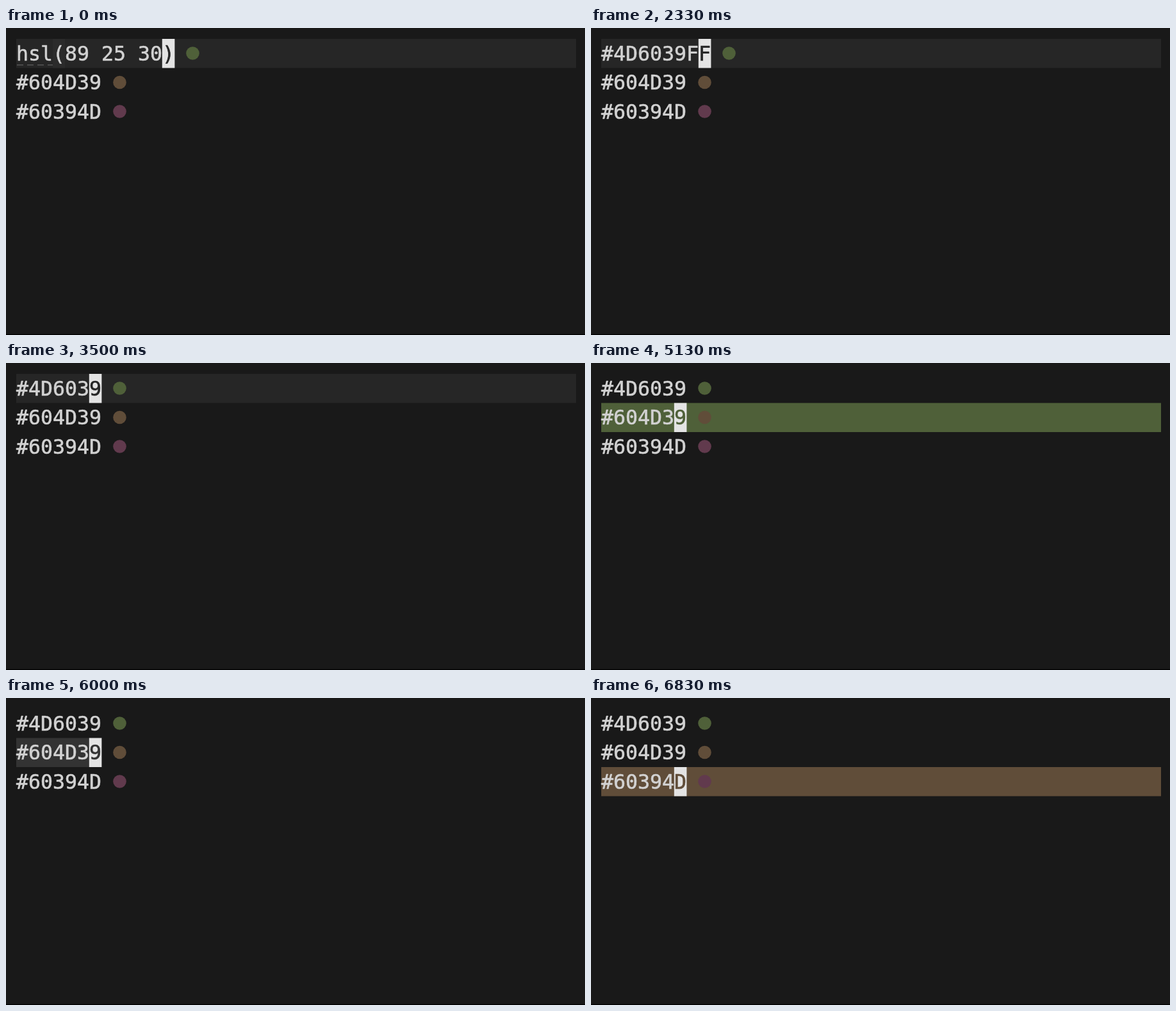
An HTML page with a canvas for the animation above (8 s loop, 904 px wide and 480 px high).

```html
<!DOCTYPE html>
<html lang="en">
<head>
<meta charset="utf-8">
<title>Editor colour tool</title>
<style>
html, body { margin: 0; width: 100%; height: 100%; overflow: hidden; background: #191919; }
canvas { display: block; }
</style>
</head>
<body>
<canvas id="stage" width="904" height="480"></canvas>
<script>
const ctx = document.getElementById('stage').getContext('2d');
const LEFT = 16, RIGHT = 890, TOP = 17, CELL = 19, ROW = 45.5;
const GREEN = '#4f6039', BROWN = '#604d39', PINK = '#613a4d';
const PLAIN = '#262626', PAREN = '#2b2b2b', SELECT = '#333333';
const HEX = '#4D6039';
const LOOP = 8000;

// Each step holds until the next: first line's text, cursor row, row colour
const steps = [
  { at: 0, text: 'hsl(89 25 30)', row: 0, bar: PLAIN },
  { at: 1250, text: 'rgba(77 96 57 / 1)', row: 0, bar: PLAIN },
  { at: 2330, text: '#4D6039FF', row: 0, bar: PLAIN },
  { at: 3500, text: HEX, row: 0, bar: PLAIN },
  { at: 4630, text: HEX, row: 0, bar: GREEN },
  { at: 5130, text: HEX, row: 1, bar: GREEN },
  { at: 6000, text: HEX, row: 1, bar: SELECT, selected: true },
  { at: 6460, text: HEX, row: 1, bar: BROWN },
  { at: 6830, text: HEX, row: 2, bar: BROWN }
];

function rect(x, y, w, h, color) {
  ctx.fillStyle = color;
  ctx.fillRect(x, y, w, h);
}

// A thin outline gives the letters a medium weight
function write(text, col, top, color) {
  ctx.fillStyle = ctx.strokeStyle = color;
  [...text].forEach((ch, i) => {
    const x = LEFT + (col + i) * CELL, y = top + 33.6;
    ctx.fillText(ch, x, y);
    ctx.strokeText(ch, x, y);
  });
}

function dot(col, top, color) {
  ctx.fillStyle = color;
  ctx.beginPath();
  ctx.arc(LEFT + (col + 1.5) * CELL, top + 22.5, 10.3, 0, Math.PI * 2);
  ctx.fill();
}

// Dashed hint under a function name, and its matching bracket
function markCall(text, top) {
  const open = text.indexOf('(');
  if (open < 0) return;
  const end = LEFT + open * CELL;
  rect(end, top, CELL, ROW, PAREN);
  for (let x = LEFT + 1; x < end; x += 16) rect(x, top + 40, Math.min(10, end - x), 1.5, '#565656');
}

function drawLine(text, color, row, step) {
  const top = TOP + row * ROW, last = text.length - 1;
  const active = row === step.row;
  if (active) {
    rect(LEFT, top, step.selected ? last * CELL : RIGHT - LEFT, ROW, step.bar);
    markCall(text, top);
  }
  write(text, 0, top, '#d2d2d2');
  if (active) {
    rect(LEFT + last * CELL - 0.2, top, CELL + 0.6, ROW, '#e4e4e4');
    write(text[last], last, top, step.bar);
  }
  if (!active || step.bar !== color) dot(text.length, top, color);
}

function frame(now) {
  const time = now % LOOP;
  const step = steps.findLast(s => s.at <= time);
  rect(0, 0, 904, 480, '#191919');
  rect(0, 478.7, 904, 1.3, '#000');
  ctx.font = '31.56px "DejaVu Sans Mono", "Noto Sans Mono", monospace';
  ctx.lineWidth = 0.6;
  ctx.lineJoin = 'round';
  drawLine(step.text, GREEN, 0, step);
  drawLine('#604D39', BROWN, 1, step);
  drawLine('#60394D', PINK, 2, step);
}

let start;
function tick(now) {
  start ??= now;
  frame(now - start);
  requestAnimationFrame(tick);
}
frame(0);
requestAnimationFrame(tick);
</script>
</body>
</html>
```
